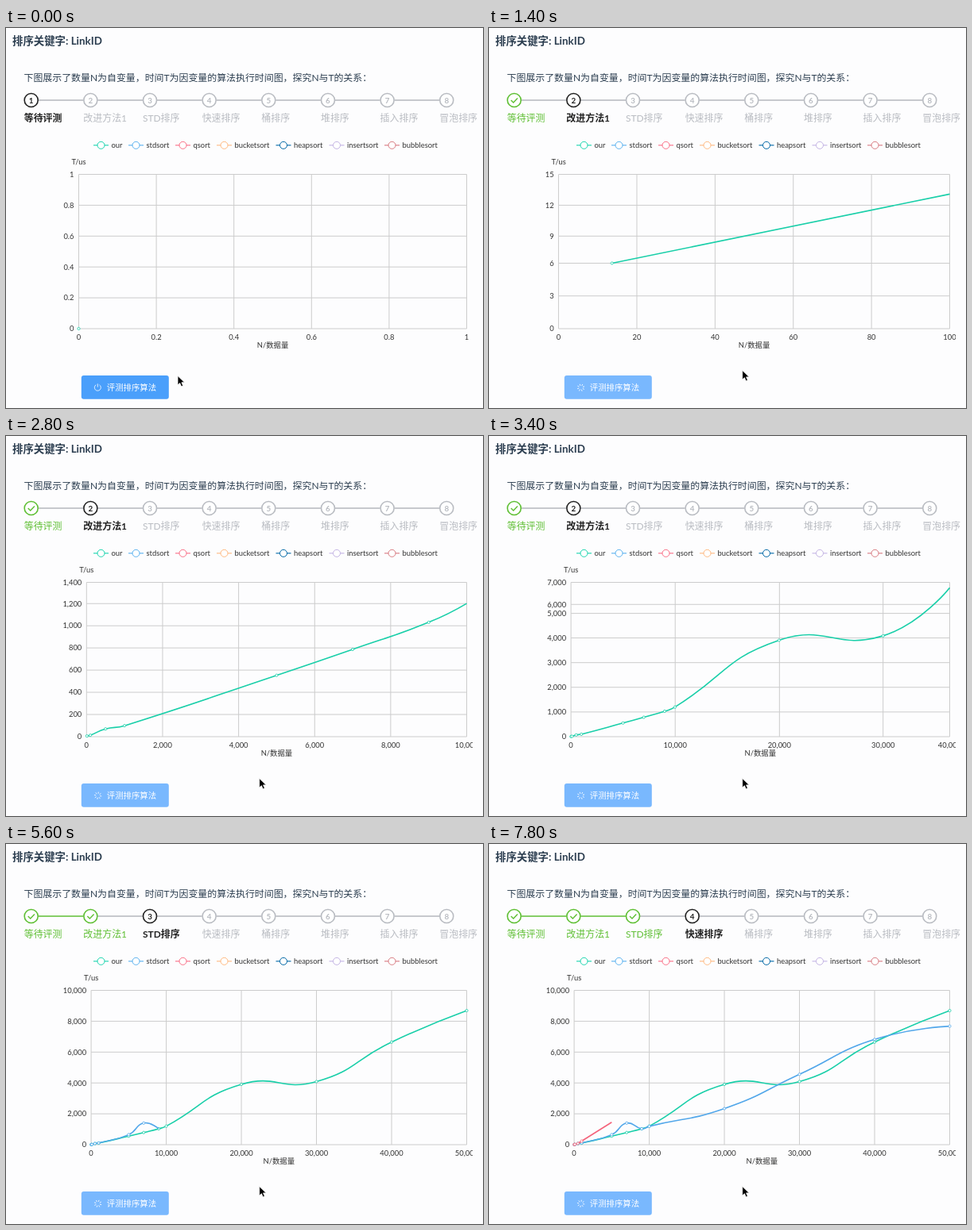
Recreate the animation shown at these times as an HTML page. Size 600x479 px, loop 8 s.

```html
<!DOCTYPE html>
<html lang="zh">
<head>
<meta charset="utf-8">
<title>排序算法评测</title>
<style>
html, body { margin: 0; width: 100%; height: 100%; overflow: hidden; background: #fdfdfe; }
svg { display: block; width: 100vw; height: 100vh; }
text { font-family: Lato, "Noto Sans CJK SC", "Noto Sans CJK", sans-serif; font-size: 9.4px; fill: #333; }
</style>
</head>
<body>
<svg id="stage" viewBox="0 0 600 479">
  <defs>
    <clipPath id="canvas"><rect x="60" y="130" width="527" height="290"/></clipPath>
    <clipPath id="plot"><rect x="80" y="183.5" width="500" height="197"/></clipPath>
  </defs>
  <rect width="600" height="479" fill="#fdfdfe"/>
  <text x="8" y="20.5" style="font-size:13.4px;font-weight:700;fill:#2c3e50">排序关键字: LinkID</text>
  <text x="22.5" y="66.8" style="font-size:11.93px;fill:#2c3e50">下图展示了数量N为自变量，时间T为因变量的算法执行时间图，探究N与T的关系：</text>
  <g id="steps"></g>
  <g id="legend"></g>
  <g id="chart" clip-path="url(#canvas)"></g>
  <g id="button"></g>
  <path id="cursor" d="M0 0V11.6L2.7 9.1L4.6 13.4L6.7 12.5L4.9 8.3H8.6Z" fill="#000" stroke="#fff" stroke-width=".8"/>
</svg>
<script>
const LOOP = 8000, FRAME = 200, PERIOD = 233, MORPH = 300;
const TOP = 184.5, BOTTOM = 379, RIGHT = 579.5;
const CLICK = 700;
const STEP_TIMES = [CLICK, 3760, 6740];
const STEPS = ['等待评测', '改进方法1', 'STD排序', '快速排序', '桶排序', '堆排序', '插入排序', '冒泡排序'];
const LEGEND = [
  ['our', 119.5, '#19d4ae'], ['stdsort', 163.5, '#5ab1ef'], ['qsort', 222.5, '#fa6e86'],
  ['bucketsort', 274.5, '#ffb980'], ['heapsort', 349, '#0067a6'],
  ['insertsort', 416, '#c4b4e4'], ['bubblesort', 485.5, '#d87a80']
];
const SIZES = [10, 100, 500, 1000, 5000, 7000, 9000, 10000, 20000, 30000, 40000, 50000];
const SERIES = [
  { start: 970, color: '#19cfa9', times: [6, 13, 70, 99, 553, 787, 1031, 1201, 3910, 4090, 6650, 8690] },
  { start: 4090, color: '#52a7ea', times: [6, 13, 75, 110, 650, 1400, 1030, 1190, 2340, 4560, 6820, 7680] },
  { start: 6840, color: '#f4647c', times: [8, 20, 80, 230, 1450] }
];
const CURSOR = [[0, 216, 438.5], [200, 200, 447], [400, 172, 455], [700, 172, 455], [1200, 318.7, 431.6]];

const $ = id => document.getElementById(id);
const clamp = (v, a, b) => Math.min(b, Math.max(a, v));
const lerp = (a, b, k) => a + (b - a) * k;
const cubicOut = k => 1 - (1 - clamp(k, 0, 1)) ** 3;
const label = v => v.toLocaleString('en-US');

const line = (x1, y1, x2, y2, color, w = 1) =>
  `<path d="M${x1} ${y1}L${x2} ${y2}" stroke="${color}" stroke-width="${w}" fill="none"/>`;
const ring = (x, y, r, color, w = 1) =>
  `<circle cx="${x}" cy="${y}" r="${r}" fill="#fff" stroke="${color}" stroke-width="${w}"/>`;
const text = (x, y, s, style = '', anchor = 'start') =>
  `<text x="${x}" y="${y}" text-anchor="${anchor}" style="${style}">${s}</text>`;

// Axis with about five round intervals from zero
function makeTicks(max) {
  const raw = max / 5, unit = 10 ** Math.floor(Math.log10(raw)), f = raw / unit;
  const step = unit * (f < 1.5 ? 1 : f < 2.5 ? 2 : f < 4 ? 3 : f < 7 ? 5 : 10);
  const n = Math.ceil(max / step - 1e-9);
  return Array.from({ length: n + 1 }, (_, i) => +(i * step).toFixed(1));
}

const labelWidth = s => [...s].reduce((w, c) => w + (c === '1' ? 4 : /\d/.test(c) ? 5.8 : 2.1), 0);

function makeScale(maxX, maxY) {
  const x = makeTicks(maxX), y = makeTicks(maxY);
  const left = 77.8 + Math.max(...y.map(v => labelWidth(label(v))));
  return {
    x, y, left,
    px: v => lerp(left, RIGHT, v / x[x.length - 1]),
    py: v => lerp(BOTTOM, TOP, v / y[y.length - 1])
  };
}

const scales = [makeScale(1, 1), ...SIZES.map((n, i) => makeScale(n, Math.max(...SERIES[0].times.slice(0, i + 1))))];

// A tick slides from wherever it was shown before; a new one appears in place
function tickPos(axis, v, k, age) {
  const end = scales[k]['p' + axis](v);
  if (!k || !scales[k - 1][axis].includes(v)) return end;
  return lerp(tickPos(axis, v, k - 1, PERIOD), end, cubicOut(age / MORPH));
}

function pointPos(n, v, k, age) {
  const a = scales[k - 1], b = scales[k], e = cubicOut(age / MORPH);
  return [
    lerp(Math.min(a.px(n), RIGHT), b.px(n), e),
    lerp(Math.max(a.py(v), TOP), b.py(v), e)
  ];
}

function smoothPath(pts) {
  let d = `M${pts[0]}`, cp = pts[0];
  for (let i = 1; i < pts.length; i++) {
    const p = pts[i], q = pts[i - 1], r = pts[i + 1];
    let inCp = p, outCp = p;
    if (r) {
      const before = Math.hypot(p[0] - q[0], p[1] - q[1]);
      const after = Math.hypot(r[0] - p[0], r[1] - p[1]);
      const ratio = after / (before + after);
      const shift = k => p.map((c, j) => c + (r[j] - q[j]) * 0.5 * k);
      inCp = shift(ratio - 1);
      outCp = shift(ratio);
    }
    d += `C${cp} ${inCp} ${p}`;
    cp = outCp;
  }
  return d;
}

function drawSteps(t) {
  const active = STEP_TIMES.filter(s => t >= s).length;
  return STEPS.map((name, i) => {
    const x = 31.7 + i * 74.65, y = 91;
    const color = i < active ? '#5fbf34' : i === active ? '#222' : '#b9bcc2';
    const bold = i === active ? 'font-weight:700;' : '';
    const mark = i < active
      ? `<path d="M${x - 4} ${y}l3 3l5.2 -5.6" fill="none" stroke="${color}" stroke-width="1.4"/>`
      : text(x, y + 3.5, i + 1, `font-size:9.8px;font-weight:700;fill:${color}`, 'middle');
    const link = i < 7 ? line(x + 9, y, x + 65.6, y, i < active - 1 ? '#5fbf34' : '#b4b7bd', 1.5) : '';
    return link + ring(x, y, 8.5, color, 1.6) + mark +
      text(x - 9, 118, name, `font-size:11.95px;${bold}fill:${color}`);
  }).join('');
}

function drawChart(t) {
  const k = clamp(Math.floor((t - SERIES[0].start) / PERIOD) + 1, 0, SIZES.length);
  const age = t - SERIES[0].start - (k - 1) * PERIOD;
  const { x, y, left } = scales[k];
  let out = '';
  for (const v of x) {
    const p = tickPos('x', v, k, age);
    out += line(p, TOP, p, BOTTOM, '#ccc') + text(p, 393, label(v), '', 'middle');
  }
  for (const v of y) {
    const p = tickPos('y', v, k, age);
    out += line(left, p, RIGHT, p, '#ccc') + text(left - 6, p + 3.3, label(v), '', 'end');
  }
  out += text(left, 172, 'T/us', '', 'middle') + text((left + RIGHT) / 2, 403, 'N/数据量', '', 'middle');
  if (!k) return out + ring(left, BOTTOM, 1.6, SERIES[0].color, .8);

  for (const { start, color, times } of SERIES) {
    if (t < start) continue;
    const count = Math.min(times.length, Math.floor((t - start) / PERIOD) + 1);
    const pts = times.slice(0, count).map((v, i) => pointPos(SIZES[i], v, k, age));
    out += `<path d="${smoothPath(pts)}" clip-path="url(#plot)" fill="none" stroke="${color}" stroke-width="1.6"/>`;
    const settled = t - start - (count - 1) * PERIOD > 400;
    const shown = count === 1 || settled ? pts : pts.slice(0, -1);
    out += shown.map(p => ring(p[0], p[1], 1.6, color, .8)).join('');
  }
  return out;
}

function drawButton(t) {
  const busy = t >= CLICK;
  let icon = '<path d="M113.2 449.8A4 4 0 1 0 117.4 449.8M115.3 448.4V452.6" fill="none" stroke="#fff" stroke-width=".8"/>';
  if (busy) {
    icon = `<g transform="translate(115.6 453.3) rotate(${t * 0.18})">`;
    for (let i = 0; i < 8; i++)
      icon += `<path d="M0 -2.5V-4.7" stroke="#fff" stroke-width=".8" transform="rotate(${i * 45})"/>`;
    icon += '</g>';
  }
  return `<rect x="94.8" y="438" width="110" height="29.7" rx="3" fill="${busy ? '#79b8fe' : '#4a9ffb'}"/>` + icon +
    text(126.8, 456.8, '评测排序算法', 'font-size:10.4px;font-weight:500;fill:#fff');
}

function cursorAt(t) {
  const i = CURSOR.findIndex(c => c[0] > t);
  if (i < 0) return CURSOR[CURSOR.length - 1].slice(1);
  const a = CURSOR[i - 1], b = CURSOR[i], k = (t - a[0]) / (b[0] - a[0]);
  return [lerp(a[1], b[1], k), lerp(a[2], b[2], k)];
}

function render(t) {
  $('steps').innerHTML = drawSteps(t);
  $('chart').innerHTML = drawChart(t);
  $('button').innerHTML = drawButton(t);
  $('cursor').setAttribute('transform', `translate(${cursorAt(t)})`);
}

$('legend').innerHTML = LEGEND.map(([name, x, color]) =>
  line(x - 9.5, 147.8, x + 9.5, 147.8, color, 1.1) + ring(x, 147.8, 4.5, color, 1) + text(x + 13, 151.2, name)
).join('');

let last = -1;
const begin = performance.now();
function tick() {
  const t = Math.floor(((performance.now() - begin) % LOOP) / FRAME) * FRAME;
  if (t !== last) render(last = t);
  requestAnimationFrame(tick);
}
tick();
</script>
</body>
</html>
```
